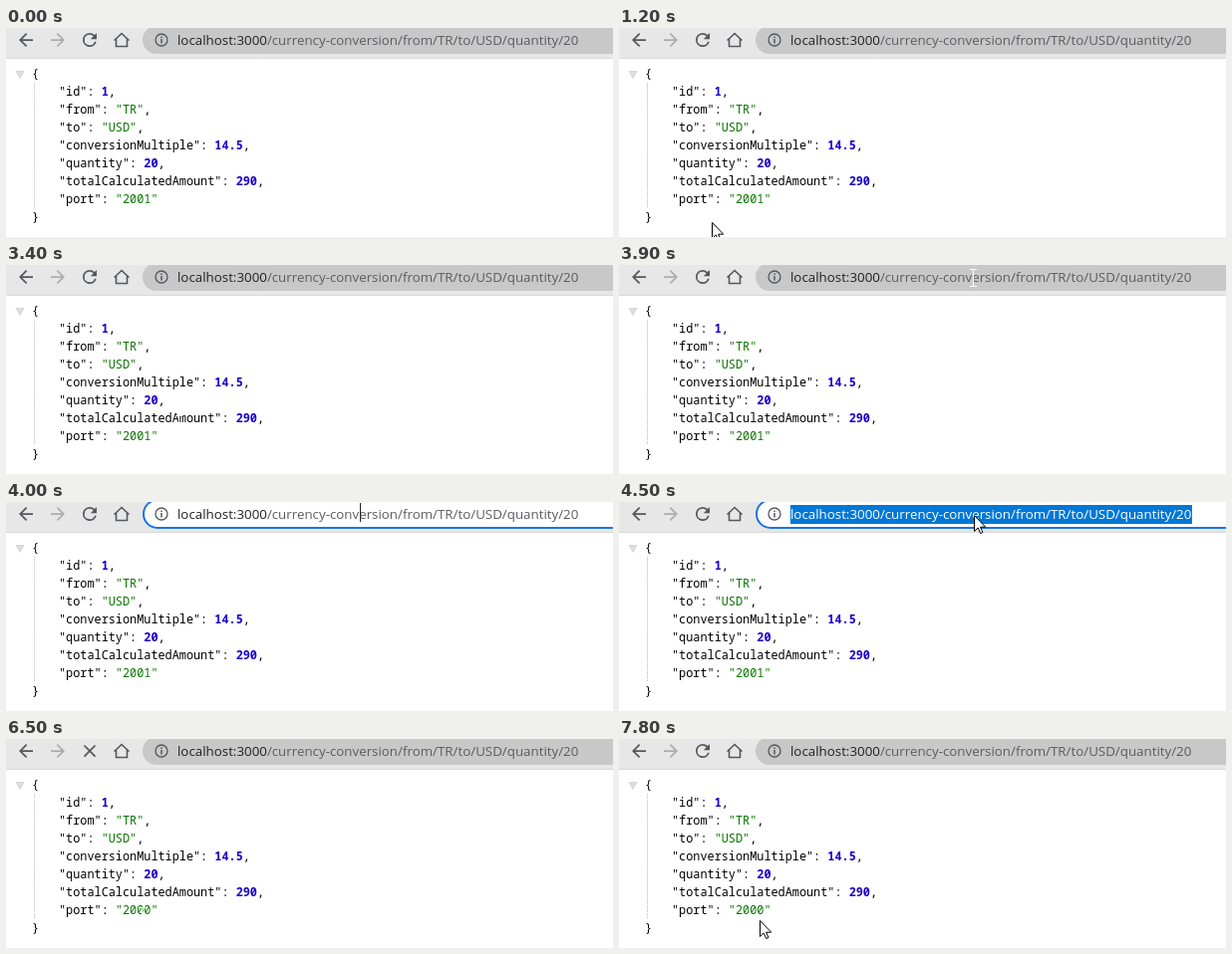
Write an HTML page that moves like this. It is 609 px wide and 210 px high and loops after 8 s.

```html
<!DOCTYPE html>
<html lang="en">
<head>
<meta charset="utf-8">
<title>Currency conversion response</title>
<style>
  html, body { margin: 0; width: 100%; height: 100%; overflow: hidden; background: #fff; }
  svg { display: block; width: 609px; height: 210px; }
  text { white-space: pre; }
  .icon { fill: #54575b; }
  .url { font: 13.34px "Open Sans", sans-serif; fill: #5a5c60; }
  .host { fill: #202124; }
  .selected text, .selected .host { fill: #fff; }
  .json { font: 11.85px "Noto Sans Mono", monospace; fill: #000; }
  .string { fill: #0b7500; }
  .number { fill: #1a01cc; font-weight: 600; }
</style>
</head>
<body>
<svg viewBox="0 0 609 210">
  <path d="M0 0H609V30H0z" fill="#e7e7e7"/>
  <path d="M0 30.5H609" stroke="#dadada"/>
  <g class="icon">
    <path id="back" transform="translate(9.5 1.5) scale(.875)" d="M20 11H7.83l5.59-5.59L12 4l-8 8 8 8 1.41-1.41L7.83 13H20z"/>
    <use href="#back" transform="translate(72 0) scale(-1 1)" opacity=".4"/>
    <path id="reload" transform="translate(73.5 1.5) scale(.875)" d="M17.65 6.35A7.96 7.96 0 0 0 12 4a8 8 0 1 0 7.73 10h-2.08A6 6 0 1 1 12 6c1.66 0 3.14.69 4.22 1.78L13 11h7V4z"/>
    <path id="stop" transform="translate(73.5 1.5) scale(.875)" d="M19 6.41 17.59 5 12 10.59 6.41 5 5 6.41 10.59 12 5 17.59 6.41 19 12 13.41 17.59 19 19 17.59 13.41 12z"/>
    <path d="M108.5 12.5 116 5.5l7.5 7M110.5 11v7.5h11V11" fill="none" stroke="#54575b" stroke-width="1.6"/>
  </g>

  <rect x="137" y="-2" width="500" height="28" rx="14" fill="#c8c8c8"/>
  <rect id="focus" x="138" y="-2" width="500" height="28" rx="14" fill="#fff" stroke="#1a73e8" stroke-width="2"/>
  <circle cx="156" cy="12" r="6" fill="none" stroke="#54575b" stroke-width="1.3"/>
  <path d="M156 8.4v1.5M156 11v4.6" stroke="#54575b" stroke-width="1.5"/>
  <g id="address">
    <rect id="selection" x="172" y="3" width="403" height="19" fill="#0078d7"/>
    <text class="url" x="172" y="17"><tspan class="host">localhost:3000</tspan>/currency-conversion/from/TR/to/USD/quantity/20</text>
  </g>
  <path id="caret" d="M355.5 1V20" stroke="#202124"/>

  <path d="M10 43.5h8l-4 7z" fill="#dedede" stroke="#c8c8c8" stroke-width=".6"/>
  <path d="M28.5 55V181" stroke="#bbb" stroke-dasharray="1 1"/>
  <g class="json" id="json">
    <text x="26" y="50">{</text>
    <text x="26" y="194">}</text>
  </g>

  <path id="arrow" d="M.5 .5v16l3.7-3.6 2.5 5.6 2.3-1-2.4-5.3h5.1z" fill="#fff" stroke="#000"/>
  <path id="beam" d="M-3 -8.5H4M.5 -9V9M-3 8.5H4" fill="none" stroke="#fff"/>
</svg>
<script>
const LOOP = 8000, STEP = 100;
const byId = id => document.getElementById(id);
const show = (id, visible) => byId(id).style.display = visible ? "" : "none";

const fields = [
  ["id", 1], ["from", "TR"], ["to", "USD"], ["conversionMultiple", 14.5],
  ["quantity", 20], ["totalCalculatedAmount", 290], ["port", "2001"]
];
fields.forEach(([key, value], row) => {
  const kind = typeof value;
  const comma = row < fields.length - 1 ? "," : "";
  byId("json").insertAdjacentHTML("beforeend",
    `<text x="53" y="${68 + row * 18}">"${key}": <tspan class="${kind}" id="value-${key}">${JSON.stringify(value)}</tspan>${comma}</text>`);
});

// Pointer: start, end, shape, from, to; each pose holds until the next move.
const moves = [
  [0, 0, "none", [0, 0], [0, 0]],
  [600, 1000, "arrow", [597, 42], [67, 188]],
  [1000, 1200, "arrow", [67, 188], [93, 195]],
  [1200, 1400, "arrow", [93, 195], [115, 186]],
  [1500, 2000, "beam", [127, 176], [134, 176]],
  [2400, 2700, "beam", [137, 176], [140, 176]],
  [3200, 3400, "beam", [141, 172], [173, 160]],
  [3600, 3900, "arrow", [205, 139], [350, 18]],
  [3900, 3900, "beam", [355, 13], [355, 13]],
  [4000, 4000, "none", [0, 0], [0, 0]],
  [4500, 4500, "arrow", [356, 13], [356, 13]],
  [5600, 5900, "arrow", [356, 13], [150, 179]],
  [6000, 6300, "beam", [131, 178], [136, 178]],
  [6700, 6700, "arrow", [141, 182], [141, 182]],
  [6900, 6900, "arrow", [144, 182], [144, 182]],
  [7100, 7200, "arrow", [143, 182], [141, 182]]
];

const easeOut = p => 1 - (1 - p) ** 2;

function drawPointer(t) {
  const [start, end, shape, from, to] = moves.findLast(move => move[0] <= t);
  const progress = end > start ? easeOut(Math.min(1, (t - start) / (end - start))) : 1;
  const [x, y] = from.map((a, i) => Math.round(a + (to[i] - a) * progress));
  for (const id of ["arrow", "beam"]) {
    show(id, id === shape);
    byId(id).setAttribute("transform", `translate(${x} ${y})`);
  }
}

const within = (t, start, end) => t >= start && t < end;

function draw(now) {
  const t = Math.floor(now % LOOP / STEP) * STEP;
  const loading = within(t, 5000, 5100) || within(t, 6500, 6600);
  const secondServer = within(t, 5100, 6600) || t >= 7800;
  const selected = within(t, 4100, 5000);
  show("reload", !loading);
  show("stop", loading);
  show("focus", within(t, 4000, 5000));
  show("caret", within(t, 4000, 4100));
  show("selection", selected);
  byId("address").classList.toggle("selected", selected);
  byId("value-port").textContent = secondServer ? '"2000"' : '"2001"';
  drawPointer(t);
}

const origin = performance.now();
function tick() {
  draw(performance.now() - origin);
  requestAnimationFrame(tick);
}
tick();
</script>
</body>
</html>
```
